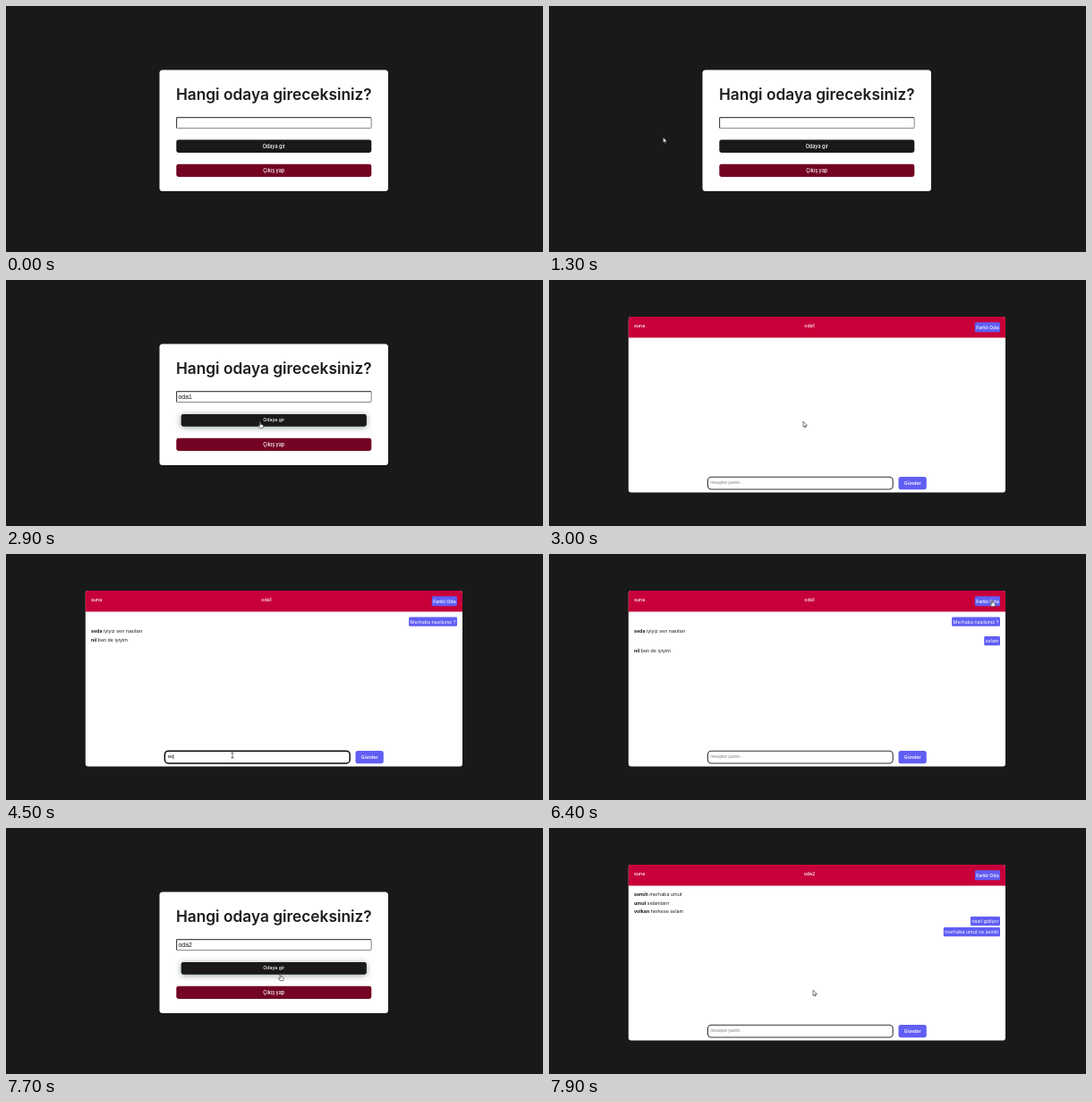
An HTML page for the animation above (8000 ms loop, 600 by 275 pixels).

```html
<!DOCTYPE html>
<html lang="tr">
<head>
<meta charset="utf-8">
<title>Sohbet odası</title>
<style>
  html, body { margin: 0; width: 100%; height: 100%; overflow: hidden; background: #1a191a; }
  svg { display: block; width: 100%; height: 100%; }
  text { font: 400 5.3px Inter, sans-serif; fill: #1d1b1c; white-space: pre; }
  .mid { text-anchor: middle; }
  .light { fill: #fff; font-weight: 500; }
  .title { font-size: 17.3px; font-weight: 600; }
  .button { font-size: 5.5px; }
  .name { font-weight: 700; }
  .typed { font: 6.8px "Liberation Sans", Arial, sans-serif; fill: #111; }
  .small { font-size: 4.1px; font-weight: 500; }
  .hint { font-size: 4px; fill: #777; }
  .accent { fill: #615ef4; }
  .field { fill: #fff; stroke: #777; stroke-width: .9; }
  .field.focus { stroke: #111; stroke-width: 1.3; }
  .message.field { stroke: #333; stroke-width: 1.1; }
  .message.field.focus { stroke: #080808; stroke-width: 1.5; }
  .press { transform-box: fill-box; transform-origin: center; }
  .press.hover { transform: scale(.95); }
  #enter.hover { filter: drop-shadow(0 1px 4px rgba(45, 80, 65, .55)); }
  .off { visibility: hidden; }
  #cursor path { stroke-linejoin: round; stroke-linecap: round; }
</style>
</head>
<body>
<svg viewBox="0 0 600 275">
  <rect width="600" height="275" fill="#1a191a"/>

  <g id="join">
    <rect x="171.5" y="71.5" width="255.5" height="135.5" rx="3.5" fill="#fff"/>
    <text class="title mid" x="299.3" y="105.3">Hangi odaya gireceksiniz?</text>
    <rect id="roomField" class="field" x="190.6" y="124.6" width="217.6" height="12" rx="1"/>
    <path id="inset" d="M190.6 136.4V124.7H408" fill="none" stroke="#333" stroke-width=".9"/>
    <text id="roomText" class="typed" x="192.6" y="133"></text>
    <rect id="roomCaret" y="126.4" width=".7" height="8.4"/>
    <g id="enter" class="press">
      <rect x="190.3" y="149.6" width="218" height="14.4" rx="2.4" fill="#1a191a"/>
      <text class="light button mid" x="299.3" y="158.6">Odaya gir</text>
    </g>
    <g id="leave" class="press">
      <rect x="190.3" y="176.8" width="218" height="14.2" rx="2.4" fill="#730223"/>
      <text class="light button mid" x="299.3" y="185.7">Çıkış yap</text>
    </g>
  </g>

  <g id="chat">
    <rect x="88.8" y="41" width="421.2" height="196.6" rx="3" fill="#fff"/>
    <path d="M88.8 64.5V44a3 3 0 0 1 3-3H507a3 3 0 0 1 3 3V64.5Z" fill="#c70039"/>
    <text class="light" x="95" y="53">suna</text>
    <text id="roomName" class="light mid" x="291" y="53"></text>
    <rect class="accent" x="475.8" y="47.2" width="28.2" height="11" rx="1.5"/>
    <text class="light mid" x="489.9" y="54.5">Farklı Oda</text>
    <rect id="messageField" class="field message" x="177.4" y="220.2" width="206.8" height="13.8" rx="4"/>
    <text id="hint" class="hint" x="180.5" y="228.3">mesajınızı yazınız ...</text>
    <text id="messageText" class="small" x="180.8" y="228.4"></text>
    <rect id="messageCaret" y="224" width=".6" height="5.4"/>
    <rect class="accent" x="390.5" y="220" width="31.3" height="14.2" rx="2.6"/>
    <text class="light mid" x="406.2" y="229" style="font-weight:600">Gönder</text>
  </g>
  <g id="threads"></g>

  <g id="cursor">
    <path id="arrow" d="M0 0V5.8L1.4 4.6L2.3 6.6L3.2 6.2L2.3 4.3H4.1Z" fill="#fff" stroke="#222" stroke-width=".6"/>
    <path id="beam" d="M-1.2 -2.8H1.2M0 -2.8V2.8M-1.2 2.8H1.2" fill="none" stroke="#333" stroke-width=".7"/>
    <path id="hand" d="M-.6 .4Q0 -.5 .6 .4V2.8L3.1 3.5Q3.7 3.8 3.5 5L2.9 7.2H-.6L-2.3 4.5Q-2.2 3.4 -.6 4.6Z" fill="#fff" stroke="#222" stroke-width=".6"/>
  </g>
</svg>

<script>
const LOOP = 8000, STEP = 100;
const $ = id => document.getElementById(id);
const show = (id, on) => $(id).classList.toggle('off', !on);
const between = (t, a, b) => t >= a && t < b;
const latest = (t, list) => list.filter(([at]) => at <= t).pop()[1];

// A string is an own message on the right; a pair is [sender, words].
const greeting = 'Merhaba nasılsınız ?';
const seda = ['seda', 'iyiyiz sen nasılsın'], nil = ['nil', 'ben de iyiyim'];
const threads = {
  none: [],
  first: [greeting, seda, nil],
  sent: [greeting, seda, nil, 'selam'],
  sorted: [greeting, seda, 'selam', nil],
  second: [['semih', 'merhaba umut'], ['umut', 'selamlarrr'], ['volkan', 'herkese selam'],
    'nasıl gidiyor', 'merhaba umut ve semih']
};

function make(tag, parent, attrs, content = '') {
  const el = document.createElementNS('http://www.w3.org/2000/svg', tag);
  for (const key in attrs) el.setAttribute(key, attrs[key]);
  el.textContent = content;
  return parent.appendChild(el);
}

function buildThread(name, rows) {
  const group = make('g', $('threads'), { id: name });
  let y = 69.6;
  for (const row of rows) {
    if (typeof row === 'string') {
      const box = make('rect', group, { class: 'accent', y: y + 1, height: 10.2, rx: 1.4 });
      const text = make('text', group, { x: 502.5, y: y + 7.9, 'text-anchor': 'end', style: 'fill:#fff' }, row);
      const width = text.getComputedTextLength() + 3;
      box.setAttribute('x', 504 - width);
      box.setAttribute('width', width);
      y += 12;
    } else {
      const text = make('text', group, { x: 95, y: y + 6.7 });
      make('tspan', text, { class: 'name' }, row[0]);
      make('tspan', text, {}, ' ' + row[1]);
      y += 9.5;
    }
  }
}
for (const name in threads) buildThread(name, threads[name]);

const path = [
  [200, 90, 67], [400, 91, 85], [1000, 91, 85], [1100, 70, 115], [1200, 70, 115],
  [1400, 185, 179], [1500, 240, 180], [1700, 266.5, 135], [2600, 266.5, 135],
  [2800, 284, 158.5], [3000, 284, 158.5], [3200, 259, 144], [3300, 259, 144],
  [3700, 253, 225], [4800, 253, 225], [5100, 405, 231], [5300, 405, 231],
  [6200, 495, 51.5], [6600, 495, 51.5], [6800, 300, 131], [7400, 300, 131],
  [7700, 306.7, 163.4], [7800, 306.7, 163.4], [7900, 295, 181.5]
];

function cursorAt(t) {
  const i = path.findIndex(([at]) => at >= t);
  const [tb, xb, yb] = path[i];
  if (i === 0) return [xb, yb];
  const [ta, xa, ya] = path[i - 1], k = (t - ta) / (tb - ta);
  return [xa + (xb - xa) * k, ya + (yb - ya) * k];
}

const views = [[0, 'join'], [3000, 'chat'], [6600, 'join'], [7800, 'chat']];
const history = [[0, 'none'], [3100, 'first'], [5200, 'sent'], [5600, 'sorted'], [6600, 'none'], [7900, 'second']];
const roomTyping = [[0, ''], [1900, 'o'], [2000, 'od'], [2100, 'oda'], [2600, 'oda1'],
  [3000, ''], [7100, 'od'], [7200, 'oda'], [7300, 'oda2']];
const messageTyping = [[0, ''], [4200, 's'], [4300, 'se'], [4500, 'sel'], [4700, 'sela'], [4800, 'selam'], [5200, '']];

function setField(kind, value, focused, caretOn) {
  const text = $(kind + 'Text');
  text.textContent = value;
  $(kind + 'Field').classList.toggle('focus', focused);
  const end = value ? text.getComputedTextLength() : 0;
  $(kind + 'Caret').setAttribute('x', +text.getAttribute('x') + end + .2);
  show(kind + 'Caret', caretOn);
}

function draw(t) {
  const view = latest(t, views), joining = view === 'join';
  show('join', joining);
  show('chat', !joining);
  const thread = latest(t, history);
  for (const name in threads) show(name, name === thread);
  $('roomName').textContent = t < 7800 ? 'oda1' : 'oda2';

  const roomFocus = between(t, 1700, 2900) || between(t, 6800, 7700);
  setField('room', latest(t, roomTyping), roomFocus, joining && roomFocus && !between(t, 2400, 2600));
  show('inset', joining && !roomFocus);
  const message = latest(t, messageTyping), messageFocus = between(t, 3900, 5100);
  setField('message', message, messageFocus, !joining && messageFocus);
  show('hint', !joining && !message);

  const [x, y] = cursorAt(t);
  const over = (x0, y0, x1, y1) => x >= x0 && x <= x1 && y >= y0 && y <= y1;
  const onEnter = joining && over(190, 149, 409, 165);
  const onLeave = joining && over(190, 176, 409, 191);
  $('enter').classList.toggle('hover', onEnter);
  $('leave').classList.toggle('hover', onLeave);
  const onField = joining ? over(190, 124, 409, 137) : over(177, 219, 385, 235);
  const onButton = onEnter || onLeave || !joining && (over(390, 219, 422, 235) || over(475, 47, 504, 58));
  const shape = onField ? 'beam' : onButton ? 'hand' : 'arrow';
  for (const id of ['arrow', 'beam', 'hand']) show(id, t >= 200 && id === shape);
  $('cursor').setAttribute('transform', `translate(${x} ${y})`);
}

const start = performance.now();
function tick() {
  const t = (performance.now() - start) % LOOP;
  draw(Math.floor(t / STEP) * STEP);
  requestAnimationFrame(tick);
}
tick();
</script>
</body>
</html>
```
